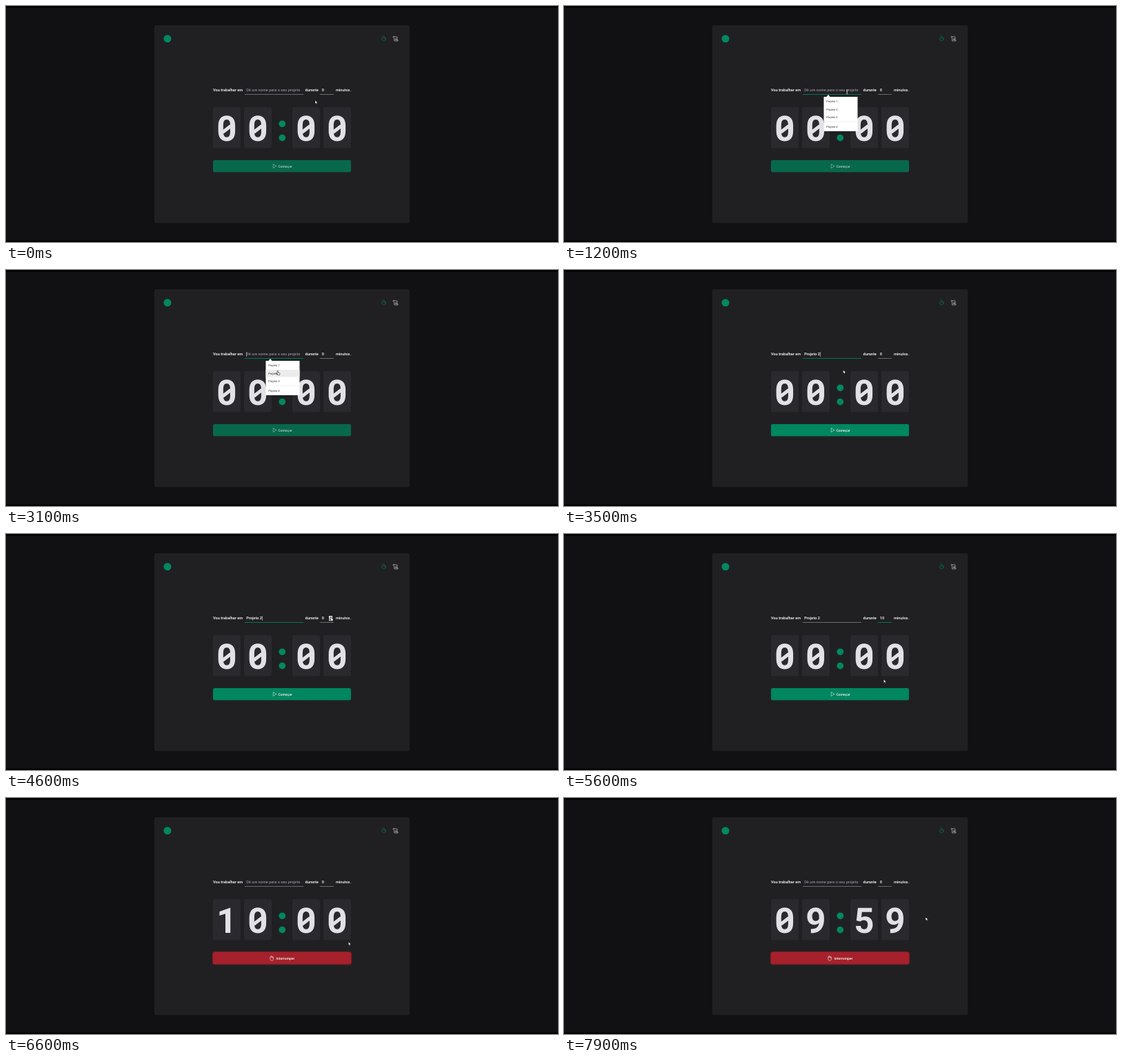
An HTML page that plays this animation: 800x343 px, repeating every 8 s.

```html
<!DOCTYPE html>
<html lang="pt-BR">
<head>
<meta charset="utf-8">
<title>Timer</title>
<style>
  html, body { margin: 0; width: 100%; height: 100%; overflow: hidden; background: #000; }
  svg { display: block; width: 100%; height: 100%; }
  text { font: 700 5.6px Roboto, Arial, sans-serif; fill: #e1e1e6; text-rendering: geometricPrecision; white-space: pre; }
  .digit { font-size: 51px; text-anchor: middle; }
  .action { font-size: 5px; }
  .menu text { font-size: 4.1px; font-weight: 400; fill: #333; }
  .line { fill: none; stroke-width: .6; stroke-linecap: round; stroke-linejoin: round; }
  .pointer { fill: #fff; stroke: #000; stroke-width: .5; stroke-linejoin: round; }
</style>
</head>
<body>
<svg viewBox="0 0 800 343">
  <rect y="2.5" width="800" height="338.5" fill="#111113"/>
  <rect x="215" y="28" width="370" height="287.5" rx="2.5" fill="#202022"/>
  <circle cx="234" cy="47.5" r="5.5" fill="#00875f"/>

  <g class="line" stroke="#00875f">
    <circle cx="547.4" cy="47.9" r="2.8"/>
    <path d="M546.5 43.9h1.8M547.4 47.9l1.3-1.3"/>
  </g>
  <g class="line" stroke="#c4c4cc">
    <path d="M564.2 46.9h2M564.2 48.4h2M562.4 49.4v-4a1 1 0 0 0-1-1h4.6a1 1 0 0 1 1 1v4M561.4 44.4a1 1 0 0 0-.5 1.7M563.6 49.4h4.4a1 1 0 0 1-.8 1.6h-3.8a1 1 0 0 1-1-1"/>
  </g>

  <text x="300" y="124.4">Vou trabalhar em</text>
  <text id="task" x="348.2" y="124.2"></text>
  <text x="433.5" y="124.4">durante</text>
  <text id="minutes" x="457.7" y="124.2"></text>
  <text x="478" y="124.4">minutos.</text>
  <rect id="taskLine" x="346" y="128.2" width="85" height=".8"/>
  <rect id="minutesLine" x="455" y="128.2" width="20" height=".8"/>
  <rect id="caret" y="119.2" width=".6" height="6.6" fill="#e1e1e6"/>

  <g id="digits"></g>
  <g fill="#00875f">
    <circle cx="400.3" cy="171.3" r="4.9"/>
    <circle cx="400.3" cy="191.6" r="4.9"/>
  </g>

  <rect id="ring" x="299.4" y="223.4" width="201.2" height="18.6" rx="2.8" fill="none" stroke="#00875f" stroke-width=".9"/>
  <rect id="button" x="300" y="224" width="200" height="17.5" rx="2.5"/>
  <g id="start">
    <path class="line" stroke="#e1e1e6" d="M387.2 230.2v5.4l4.5-2.7z"/>
    <text class="action" x="394.4" y="234.6">Começar</text>
  </g>
  <g id="stop">
    <path class="line" stroke="#e1e1e6" d="M382.7 231.6v2.2a2.5 2.5 0 0 0 5 0v-2.2a.7.7 0 0 0-1.4 0v-.9a.7.7 0 0 0-1.4 0v-.5a.7.7 0 0 0-1.4 0v1.4a.5.5 0 0 0-.8 0M384.9 230.7v1.6M386.3 231.6v1.2"/>
    <text class="action" x="391.6" y="234.6">Interromper</text>
  </g>

  <g id="menu" class="menu">
    <path d="M376.5 132h4l2.5-3.2 2.5 3.2h40v50h-49z" fill="#fff"/>
    <rect id="itemHover" x="376.5" y="145" width="49" height="10.4" fill="#ececec"/>
    <path d="M376.5 168.3h49" stroke="#ddd" stroke-width=".5"/>
  </g>

  <g id="spinner">
    <rect x="468" y="119" width="5" height="7.2" fill="#efefef"/>
    <path d="M469 121.8l1.5-1.6 1.5 1.6zM469 123.6l1.5 1.6 1.5-1.6z" fill="#555"/>
  </g>

  <g id="cursor">
    <path id="arrow" class="pointer" d="M0 0v5.2l1.2-1.1.8 1.9 1-.4-.8-1.9h1.6z"/>
    <path id="beam" class="line" stroke="#c8c8c8" d="M-1-3.2q1 0 1 .8v4.8q0 .8-1 .8M1-3.2q-1 0-1 .8v4.8q0 .8 1 .8"/>
    <path id="hand" class="pointer" d="M-.7 2.6v-4.9q0-.7.6-.7t.6.7v2.2l2.1.5q.7.2.6.9l-.5 2.1h-3l-2-2.3q-.3-.5.2-.7t.9.4z"/>
  </g>
</svg>
<script>
const LOOP = 8000, STEP = 100;
const GREEN = '#00875f', GRAY = '#7c7c8a';
const SVG_NS = 'http://www.w3.org/2000/svg';
const byId = id => document.getElementById(id);
const set = (id, name, value) => byId(id).setAttribute(name, value);
const show = (id, on) => set(id, 'visibility', on ? 'inherit' : 'hidden');

function add(parent, tag, attrs, text = '') {
  const node = parent.appendChild(document.createElementNS(SVG_NS, tag));
  for (const name in attrs) node.setAttribute(name, attrs[name]);
  node.textContent = text;
  return node;
}

const cells = [320, 365, 435, 480].map(x => {
  add(byId('digits'), 'rect', { x: x - 20, y: 147, width: 40, height: 59.5, rx: 2.5, fill: '#29292e' });
  const digit = add(byId('digits'), 'text', { class: 'digit', x, y: 196.2 });
  const slash = add(byId('digits'), 'path', { d: `M${x - 6} 183.4l12-9.2`, stroke: '#e1e1e6', 'stroke-width': 5 });
  return { digit, slash };
});

[140.4, 151.5, 162.6, 176.9].forEach((y, i) =>
  add(byId('menu'), 'text', { x: 380.2, y }, `Projeto ${i + 1}`));

// Cursor waypoints: time, x, y
const path = [
  [0, 448, 137], [500, 410.3, 125], [2500, 410.3, 125], [3000, 393.8, 149.2],
  [3300, 393.8, 149.2], [4100, 463, 124], [4500, 471, 122.8], [5100, 471, 122.8],
  [5800, 461.3, 233], [6100, 461.3, 233], [6500, 496.3, 209], [7700, 496.3, 209], [7900, 524, 173]
];

function cursorAt(t) {
  const next = path.findIndex(p => p[0] > t);
  if (next < 0) return path[path.length - 1].slice(1);
  const [t0, x0, y0] = path[next - 1], [t1, x1, y1] = path[next];
  const u = (t - t0) / (t1 - t0), k = u * u * (3 - 2 * u);
  return [x0 + (x1 - x0) * k, y0 + (y1 - y0) * k];
}

function caretVisible(t) {
  if (t < 500 || t >= 4700) return false;
  if (t >= 3300) return Math.floor((t - 3300) / 500) % 2 === 0;
  return t < 1200 || (t >= 1700 && t < 2200) || t >= 2700;
}

function drawFields(t, running) {
  const named = t >= 3300 && !running;
  const taskFocus = t >= 500 && t < 4700;
  const minutesFocus = t >= 4700 && t < 5900;
  byId('task').textContent = named ? 'Projeto 2' : 'Dê um nome para o seu projeto';
  byId('task').style.fill = named ? '#e1e1e6' : GRAY;
  byId('minutes').textContent = running || t < 4700 ? '0' : t < 5000 ? '5' : '10';
  set('taskLine', 'fill', taskFocus ? GREEN : GRAY);
  set('minutesLine', 'fill', minutesFocus ? GREEN : GRAY);
  set('caret', 'x', named ? 371.4 : 348);
  show('caret', caretVisible(t));
  show('menu', t >= 500 && t < 3300);
  show('itemHover', t >= 2900 && t < 3300);
}

function drawButton(t, running, hover) {
  const color = running ? (hover ? '#7a1921' : '#a6212b')
    : hover ? '#015f43' : t < 3300 ? '#08684b' : GREEN;
  set('button', 'fill', color);
  set('start', 'opacity', t < 3300 ? .7 : 1);
  show('start', !running);
  show('stop', running);
  show('ring', t >= 5900);
  set('ring', 'stroke', running ? '#861c25' : GREEN);
}

function drawClock(t, running) {
  const time = !running ? '0000' : t < 7100 ? '1000' : '0959';
  cells.forEach(({ digit, slash }, i) => {
    digit.textContent = time[i];
    slash.setAttribute('visibility', time[i] === '0' ? 'visible' : 'hidden');
  });
}

function drawCursor(t, x, y, onButton) {
  const overTask = y > 118 && y < 130 && x > 346 && x < 431;
  const overMinutes = y > 118 && y < 130 && x > 455 && x < 476;
  const overSpinner = overMinutes && x > 467;
  const overItem = t >= 2700 && t < 3300 && y > 132;
  const kind = overItem || overSpinner || onButton ? 'hand' : overTask || overMinutes ? 'beam' : 'arrow';
  for (const id of ['arrow', 'beam', 'hand']) show(id, id === kind);
  show('spinner', overMinutes);
  set('cursor', 'transform', `translate(${x} ${y})`);
}

function draw(time) {
  const t = Math.floor(time % LOOP / STEP) * STEP;
  const running = t >= 6100;
  const [x, y] = cursorAt(t);
  const onButton = y > 224 && y < 242;
  drawFields(t, running);
  drawButton(t, running, onButton);
  drawClock(t, running);
  drawCursor(t, x, y, onButton);
}

const began = performance.now();
function tick() {
  draw(performance.now() - began);
  requestAnimationFrame(tick);
}
tick();
</script>
</body>
</html>
```
